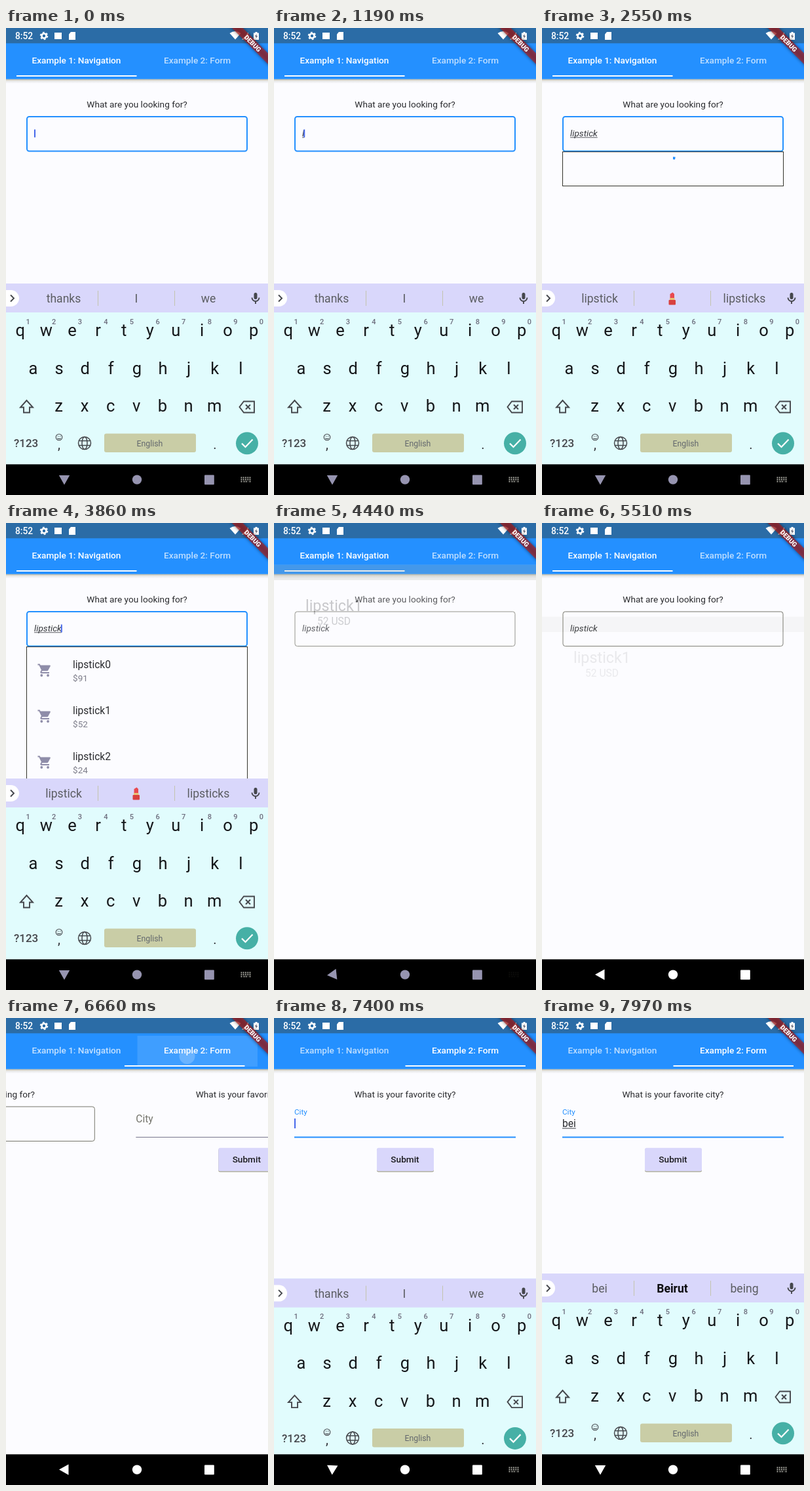
An HTML page for the animation above (8000 ms loop, 400 px wide and 711 px high).

```html
<!DOCTYPE html>
<html lang="en">
<head>
<meta charset="utf-8">
<style>
html, body { margin: 0; width: 100%; height: 100%; overflow: hidden; background: #fcfcff; }
svg { display: block; width: 100%; height: 100%; font-family: Roboto, "Open Sans", sans-serif; font-size: 13.62px; }
.mid { text-anchor: middle; }
.medium { font-weight: 500; }
.body { font-size: 15.57px; }
.line { fill: none; stroke: #45474c; stroke-width: 1.9; }
.words { font-size: 17.6px; fill: #5b5d62; }
.key { font-size: 25.5px; fill: #15171a; }
.hint { font-size: 11px; font-weight: 500; fill: #6c6c7c; }
</style>
</head>
<body>
<svg viewBox="0 0 400 711">
  <defs>
    <linearGradient id="shade" x2="0" y2="1">
      <stop stop-color="#8e8e78" stop-opacity=".75"/>
      <stop offset=".35" stop-color="#b8b8a8" stop-opacity=".35"/>
      <stop offset="1" stop-color="#c8c8d8" stop-opacity="0"/>
    </linearGradient>
    <filter id="blur" x="-20%" y="-100%" width="140%" height="300%"><feGaussianBlur stdDeviation="2.5"/></filter>
    <clipPath id="dropClip"><rect id="dropMask" x="30" y="188" width="340"/></clipPath>
  </defs>
  <rect width="400" height="711" fill="#fcfcff"/>

  <g id="content">
    <g id="search">
      <text class="mid" x="200" y="121" fill="#2a2b2e">What are you looking for?</text>
      <rect id="field" x="32" y="135" width="336" height="52.5" rx="3.5" fill="none"/>
      <text id="query" x="43" y="165" font-style="italic" fill="#34363a"></text>
      <rect id="queryLine" x="43" y="166.3" height=".9" fill="#4a4c52"/>
      <rect id="queryCaret" y="154.5" width="2" height="12" fill="#4668ea"/>
      <g id="drop">
        <rect id="dropBox" x="31.5" y="188.5" width="337" fill="#fcfcff" stroke="#34342c"/>
        <path id="spinner" fill="none" stroke="#2490ff" stroke-width="3.9"/>
        <g id="results" clip-path="url(#dropClip)">
          <rect id="rowTap" x="32" y="259" width="336" height="70"/>
        </g>
      </g>
    </g>
    <g transform="translate(400)">
      <text class="mid" x="200" y="121" fill="#2a2b2e">What is your favorite city?</text>
      <text id="cityLabel" x="31">City</text>
      <text id="city" class="body" x="31" y="166" fill="#2a2b2e"></text>
      <rect id="cityLine" x="31" y="167.5" height="1" fill="#3a3c40"/>
      <rect id="cityCaret" y="153" width="2" height="15" fill="#4668ea"/>
      <rect id="cityRule" x="31" width="338"/>
      <rect x="157" y="199" width="87" height="35.5" rx="2.5" fill="#a5a58f"/>
      <rect x="157" y="197.7" width="87" height="35.5" rx="2.5" fill="#d9d7fb"/>
      <text class="mid medium" x="200" y="219.5" fill="#1c1c20">Submit</text>
    </g>
  </g>

  <rect y="77.8" width="400" height="7" fill="url(#shade)"/>
  <rect width="400" height="77.8" fill="#2490ff"/>
  <rect width="400" height="23.3" fill="#2b6ca6"/>
  <g id="tabTap" fill="#fff">
    <rect x="200.5" y="27" width="183.5" height="47" opacity=".12"/>
    <circle id="tapDot" cx="276.5" cy="58" opacity=".22"/>
  </g>
  <text id="tab1" class="mid medium" x="107.5" y="54" fill="#fff">Example 1: Navigation</text>
  <text id="tab2" class="mid medium" x="292" y="54" fill="#fff">Example 2: Form</text>
  <rect id="indicator" y="72" width="183.5" height="1.95" fill="#fff"/>

  <g id="product">
    <rect width="400" height="890" fill="#fcfcff"/>
    <rect width="400" height="23.3" fill="#b3b3a6"/>
    <text class="mid" x="91.5" y="70.5" font-size="23.35" fill="#202124">lipstick1</text>
    <text class="mid body" x="91.5" y="91" fill="#303236">52 USD</text>
  </g>

  <g id="keyboard">
    <rect y="389" width="400" height="276" fill="#e1fcfd"/>
    <rect y="389" width="400" height="44" fill="#d9d7fb"/>
    <rect x="-20" y="399" width="40" height="25" rx="12.5" fill="#fff"/>
    <path class="line" d="M7 406.5l5 5-5 5"/>
    <path d="M140.5 400v23M257.5 400v23" stroke="#c3c4ae"/>
    <g class="words mid">
      <text id="word0" x="88" y="418"></text>
      <text id="word1" x="199" y="418"></text>
      <text id="word2" x="309" y="418"></text>
    </g>
    <g id="emoji">
      <path d="M195.5 412v-7l4-2.500 2.500 2.500v7z" fill="#e84a50"/>
      <rect x="195" y="411" width="7.5" height="3.5" fill="#e9c578"/>
      <rect x="193.500" y="414" width="10.500" height="7.500" rx="1" fill="#d8413f"/>
    </g>
    <rect x="378.5" y="403" width="5" height="10" rx="2.5" fill="#45474c"/>
    <path class="line" d="M375.5 410.5a5.500 5.500 0 0 0 11 0M381 416v4"/>
    <g id="keys"></g>
    <path class="line" d="M31.500 567l-9.500 10.500h5v8h9v-8h5z"/>
    <path class="line" d="M363 568.500h16v17h-16l-6.500-8.500zM366 573.500l7 7m0-7l-7 7"/>
    <text class="medium" x="12" y="638" font-size="17" fill="#45474c">?123</text>
    <circle class="line" style="stroke-width:1.1" cx="81" cy="623" r="4.8"/>
    <path class="line" style="stroke-width:1.1" d="M78.500 624.500q2.500 2.600 5 0M79 621.500h1.200m1.800 0h1.200"/>
    <text class="mid" x="81" y="641" font-size="20" fill="#303238">,</text>
    <g class="line" style="stroke-width:1.5">
      <circle cx="120" cy="632" r="9.500"/><ellipse cx="120" cy="632" rx="4" ry="9.500"/>
      <path d="M111.500 628.500h17m-17 7h17"/>
    </g>
    <rect x="150" y="617.500" width="140" height="28.500" rx="3" fill="#c9cda6"/>
    <text class="mid" x="219.500" y="636.500" font-size="12.3" fill="#62676d">English</text>
    <text class="mid" x="319" y="641" font-size="20" fill="#303238">.</text>
    <circle cx="368" cy="632.3" r="17" fill="#46b0a6"/>
    <path d="M360 632.500l5.500 5.500 11-11.500" fill="none" stroke="#fff" stroke-width="2.2"/>
  </g>

  <rect y="664.3" width="400" height="47" fill="#000"/>
  <g id="nav">
    <path id="back" d="M81 687.600l14.500-8.200v16.400z"/>
    <circle cx="200" cy="687.6" r="7.2"/>
    <rect x="303" y="680.4" width="14.800" height="14.800" rx="1"/>
  </g>
  <path id="imeIcon" d="M358.500 684.500h15m-15 3h15m-15 3h2m2 0h7m2 0h2" stroke="#a3a39c" stroke-width="1.8" stroke-dasharray="2 1.25"/>

  <g fill="#fff">
    <text class="medium" x="14" y="17" font-size="13.8">8:52</text>
    <g fill="none" stroke="#fff">
      <circle cx="58" cy="12" r="3.500" stroke-width="2.6"/>
      <circle cx="58" cy="12" r="5.400" stroke-width="1.8" stroke-dasharray="2.8 2.855"/>
    </g>
    <rect x="74" y="7" width="11" height="10"/>
    <path d="M96 9.500l3-3.500h7v12h-10z"/>
    <path d="M341.500 8q8.500-6 17 0l-8.500 9.500z"/>
    <path d="M360 17.500l10-11v11z"/>
    <path d="M378 7.500h2.500v-1.500h3v1.500h2.500v10.500h-8z"/>
    <path d="M382.500 9l-2.500 4h1.700v3l2.500-4h-1.700z" fill="#667"/>
  </g>
  <g transform="translate(400) rotate(45) scale(.973)">
    <rect x="-52" y="28" width="104" height="12" opacity=".5" filter="url(#blur)"/>
    <rect x="-52" y="28" width="104" height="12" fill="#b71c1c" opacity=".63"/>
    <text class="mid" y="37.6" font-size="10.2" font-weight="900" fill="#fff">DEBUG</text>
  </g>
</svg>
<script>
const LOOP = 8000;
const el = {};
document.querySelectorAll('[id]').forEach(node => el[node.id] = node);

const set = (node, attrs) => { for (const k in attrs) node.setAttribute(k, attrs[k]); };
const show = (node, on) => set(node, { visibility: on ? 'visible' : 'hidden' });
const mix = (a, b, p) => a + (b - a) * p;
const span = (t, from, to) => Math.min(1, Math.max(0, (t - from) / (to - from)));
const within = (t, from, to) => t >= from && t < to;

function bezier(x1, y1, x2, y2) {
  const at = (a, b, u) => 3 * a * u * (1 - u) ** 2 + 3 * b * u * u * (1 - u) + u ** 3;
  return x => {
    let lo = 0, hi = 1;
    for (let i = 0; i < 24; i++) {
      const m = (lo + hi) / 2;
      if (at(x1, x2, m) < x) lo = m; else hi = m;
    }
    return at(y1, y2, (lo + hi) / 2);
  };
}
const ease = bezier(.25, .1, .25, 1);
const easeIn = bezier(.42, 0, 1, 1);
const fastOutSlowIn = bezier(.4, 0, .2, 1);

const QUERY_TIMES = [1150, 1330, 1500, 1690, 1870, 1970, 2140, 2240];
const CITY_TIMES = [7600, 7730, 7850];
const typed = (word, times, t) => word.slice(0, times.filter(x => t >= x).length);

const SUGGESTIONS = [
  [0, 'thanks', 'I', 'we'],
  [1330, 'li', 'like', 'I'],
  [1690, 'lips', 'lipstick', 'lip'],
  [2140, 'lipstic', 'lipstick', 'lipsticks'],
  [2340, 'lipstick', '', 'lipsticks'],
  [4600, 'thanks', 'I', 'we'],
  [7650, 'b', 'be', 'by'],
  [7780, 'be', 'be', 'been'],
  [7930, 'bei', 'Beirut', 'being'],
];

function buildKeys() {
  let out = '';
  ['qwertyuiop', 'asdfghjkl', 'zxcvbnm'].forEach((row, r) => {
    [...row].forEach((letter, i) => {
      const x = [21.8, 41.5, 80.5][r] + 39.6 * i;
      out += `<text class="key mid" x="${x}" y="${469 + 57.5 * r}">${letter}</text>`;
      if (!r) out += `<text class="hint mid" x="${x + 11.8}" y="450.5">${(i + 1) % 10}</text>`;
    });
  });
  el.keys.innerHTML = out;
}

function buildResults() {
  [91, 52, 24].forEach((price, i) => {
    el.results.insertAdjacentHTML('beforeend', `<g transform="translate(0 ${70 * i})">
      <g transform="translate(47.5 212.5) scale(.973)" fill="#8f8da9">
        <path d="M1 2h3.300l.9 2H20q1.400.2.9 1.500l-3.600 6.500q-.6 1-1.800 1H8.100l-1 1.900H19v2H7q-3-.3-1.700-3l1.300-2.400L3 4H1z"/>
        <circle cx="7" cy="20" r="2"/><circle cx="17" cy="20" r="2"/>
      </g>
      <text class="body" x="102" y="220.5" fill="#2a2b2e">lipstick${i}</text>
      <text x="102" y="240.5" fill="#7d7d8a">$${price}</text></g>`);
  });
}

function drawInput(name, x, text, underlined, caretOn) {
  el[name].textContent = text;
  const width = text ? el[name].getComputedTextLength() : 0;
  set(el[name + 'Line'], { width: underlined ? width : 0 });
  set(el[name + 'Caret'], { x: x + Math.max(0, width - 1) });
  show(el[name + 'Caret'], caretOn);
}

function drawSpinner(t) {
  const time = (t - 2550) / 1333;
  const cycle = time % 1;
  const head = fastOutSlowIn(span(cycle, 0, .5));
  const tail = fastOutSlowIn(span(cycle, .5, 1));
  const start = -Math.PI / 2 + tail * 1.5 * Math.PI + time * 1.2 * Math.PI;
  const sweep = Math.max((head - tail) * 1.5 * Math.PI, .2);
  const point = a => `${200 + 16.5 * Math.cos(a)} ${214.5 + 16.5 * Math.sin(a)}`;
  set(el.spinner, { d: `M${point(start)}A16.5 16.5 0 ${+(sweep > Math.PI)} 1 ${point(start + sweep)}` });
}

function drawSearch(t) {
  const focused = t < 4350;
  const blink = t < 1150 ? !within(t, 300, 800) : t < 2340 || Math.floor((t - 2340) / 500) % 2 === 1;
  set(el.field, focused ? { stroke: '#2490ff', 'stroke-width': 2 } : { stroke: '#77776c', 'stroke-width': 1 });
  drawInput('query', 43, typed('lipstick', QUERY_TIMES, t), focused, focused && blink);

  const loading = within(t, 2550, 3370);
  const open = within(t, 2550, 4350);
  const grow = fastOutSlowIn(mix(.25, 1, span(t, 3370, 3830)));
  const height = loading ? 52 : Math.max(30, 206 * grow);
  el.drop.style.display = open ? '' : 'none';
  set(el.dropBox, { height });
  set(el.dropMask, { height });
  el.spinner.style.display = loading ? '' : 'none';
  el.results.style.display = loading ? 'none' : '';
  set(el.rowTap, { opacity: .1 * span(t, 4220, 4300) });
  if (loading) drawSpinner(t);
}

function drawForm(t) {
  const focused = t >= 7170;
  const float = fastOutSlowIn(span(t, 7170, 7370));
  set(el.cityLabel, {
    y: mix(158.5, 147, float), 'font-size': mix(15.57, 11.68, float),
    fill: focused ? '#2490ff' : '#74746c',
  });
  set(el.cityRule, focused ? { y: 180.5, height: 2, fill: '#2490ff' } : { y: 181, height: 1, fill: '#77758c' });
  drawInput('city', 31, typed('bei', CITY_TIMES, t), true, within(t, 7200, 7930));
}

function drawTabs(t) {
  const lead = ease(span(t, 6477, 6777));
  const slide = ease(span(t, 6560, 6860));
  set(el.content, { transform: `translate(${-400 * slide})` });
  set(el.indicator, { x: mix(16, 200.5, lead) });
  set(el.tab1, { opacity: mix(1, .7, lead) });
  set(el.tab2, { opacity: mix(.7, 1, lead) });
  set(el.tabTap, { opacity: span(t, 6440, 6540) * (1 - span(t, 6700, 6860)) });
  set(el.tapDot, { r: mix(8, 12, span(t, 6450, 6660)) });
}

function drawProduct(t) {
  const p = span(t, 4300, 4640) - span(t, 5120, 5630);
  el.product.style.display = p > 0 ? '' : 'none';
  set(el.product, { opacity: easeIn(p), transform: `translate(0 ${178 * (1 - fastOutSlowIn(p))})` });
}

function drawKeyboard(t) {
  const up = 1 - fastOutSlowIn(span(t, 4270, 4520)) + fastOutSlowIn(span(t, 7200, 7450));
  set(el.keyboard, { transform: `translate(0 ${322 * (1 - up)})` });
  const words = SUGGESTIONS.filter(s => t >= s[0]).pop();
  [0, 1, 2].forEach(i => { el['word' + i].textContent = words[i + 1]; });
  const bold = words[2] === 'Beirut';
  set(el.word1, { 'font-weight': bold ? 700 : 400, fill: bold ? '#0c0c10' : '#5b5d62' });
  show(el.emoji, !words[2]);
  set(el.back, { transform: `rotate(${-90 * up} 89 687.6)` });
  set(el.imeIcon, { opacity: up });
  set(el.nav, { fill: t < 5120 ? '#9694b0' : '#fff' });
}

function draw(t) {
  drawSearch(t);
  drawForm(t);
  drawTabs(t);
  drawProduct(t);
  drawKeyboard(t);
}

buildKeys();
buildResults();
const began = performance.now();
function tick() {
  draw((performance.now() - began) % LOOP);
  requestAnimationFrame(tick);
}
tick();
</script>
</body>
</html>
```
